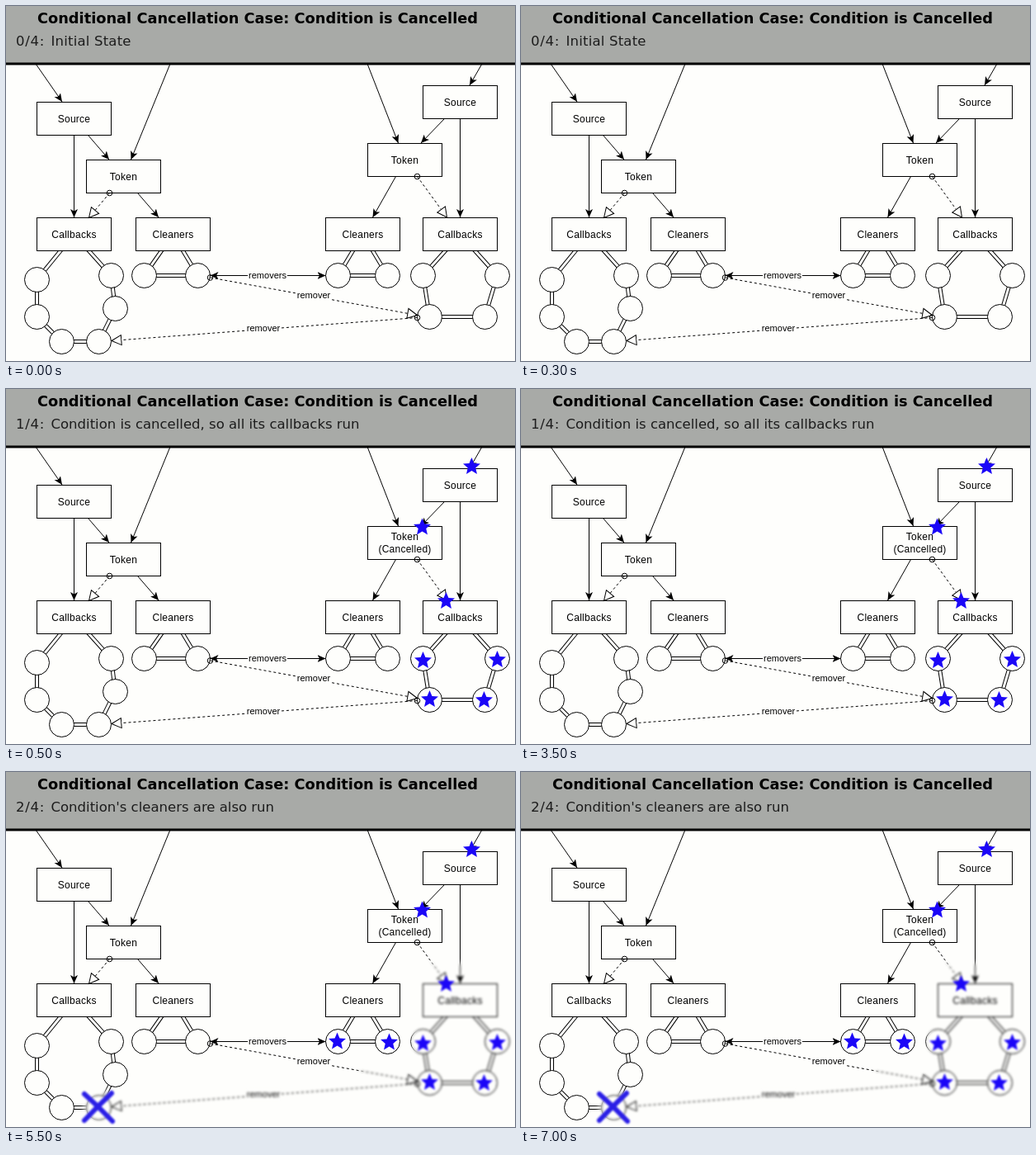
Recreate the animation shown at these times as an HTML page. Size 617x430 px, loop 8 s.

```html
<!DOCTYPE html>
<html lang="en">
<head>
<meta charset="utf-8">
<title>Conditional cancellation</title>
<style>
  html, body { margin: 0; width: 100%; height: 100%; overflow: hidden; background: #fefefc; }
  svg { display: block; width: 617px; height: 430px; }
  .label { font: 12px "Liberation Sans", Arial, sans-serif; letter-spacing: .25px; text-anchor: middle; }
  .tag { font: 11px "Liberation Sans", Arial, sans-serif; text-anchor: middle; }
  .title { font: bold 17.8px "DejaVu Sans", sans-serif; text-anchor: middle; }
  .caption { font: 16.5px "DejaVu Sans", sans-serif; fill: #1c1c1c; }
  .shape { fill: #fefefc; stroke: #000; }
  .edge { fill: none; stroke: #000; }
  .dashed { stroke-dasharray: 3 3; }
</style>
</head>
<body>
<svg viewBox="0 0 617 430">
  <defs>
    <marker id="head" markerUnits="userSpaceOnUse" markerWidth="12" markerHeight="12" refX="10" refY="5" orient="auto-start-reverse">
      <path d="M10 5L0 .5L2.5 5L0 9.5Z"/>
    </marker>
    <marker id="hollow" markerUnits="userSpaceOnUse" markerWidth="14" markerHeight="14" refX="12.5" refY="7" orient="auto">
      <path d="M12.5 7L.7 1V13Z" class="shape"/>
    </marker>
    <marker id="ring" markerUnits="userSpaceOnUse" markerWidth="9" markerHeight="9" refX="4.5" refY="4.5">
      <circle cx="4.5" cy="4.5" r="3.3" class="edge"/>
    </marker>
    <filter id="blur" filterUnits="userSpaceOnUse" x="0" y="0" width="617" height="430" color-interpolation-filters="sRGB">
      <feGaussianBlur stdDeviation="1.8"/>
    </filter>
    <filter id="smudge" filterUnits="userSpaceOnUse" x="0" y="0" width="617" height="430" color-interpolation-filters="sRGB">
      <feGaussianBlur stdDeviation="1"/>
    </filter>
    <filter id="soften" filterUnits="userSpaceOnUse" x="0" y="0" width="640" height="450">
      <feGaussianBlur stdDeviation="3"/>
    </filter>
    <g id="retired" filter="url(#soften)" fill="currentColor" stroke="currentColor">
      <path d="M494 232H640V402H494Z" stroke="none"/>
      <path d="M116 406L505 377" stroke-width="24"/>
      <path d="M430 363L505 376" stroke-width="20"/>
      <circle cx="115" cy="406" r="19"/>
    </g>
    <mask id="outside" maskUnits="userSpaceOnUse" x="0" y="0" width="617" height="430">
      <rect width="617" height="430" fill="#fff"/>
      <use href="#retired" color="#000"/>
    </mask>
    <mask id="inside" maskUnits="userSpaceOnUse" x="0" y="0" width="617" height="430">
      <use href="#retired" color="#fff"/>
    </mask>
  </defs>
  <rect width="617" height="430" fill="#fefefc"/>
  <g id="sharp"><g id="diagram"></g></g>
  <g id="faded" mask="url(#inside)"><g filter="url(#blur)"><use href="#diagram"/></g></g>
  <g fill="#1b06f7">
    <g id="sourceStars"></g>
    <g id="callbackStars"></g>
    <g id="cleanerStars"></g>
  </g>
  <path id="cross" d="M95 390Q112 405 129 423M128 389Q112 404 95 422" fill="none" stroke="#2a1ee6" stroke-width="6" stroke-linecap="round" filter="url(#smudge)"/>
  <rect width="617" height="69" fill="#a8aaa7"/>
  <rect y="68.5" width="617" height="3"/>
  <text class="title" x="305" y="21">Conditional Cancellation Case: Condition is Cancelled</text>
  <text class="caption" id="count" x="12" y="48" letter-spacing=".7"></text>
  <text class="caption" id="caption" x="54.5" y="48"></text>
</svg>
<script>
const NS = 'http://www.w3.org/2000/svg';
const byId = id => document.getElementById(id);
const diagram = byId('diagram');

function add(parent, tag, attrs, text = '') {
  const node = document.createElementNS(NS, tag);
  for (const key in attrs) node.setAttribute(key, attrs[key]);
  node.textContent = text;
  return parent.appendChild(node);
}
const label = (x, y, text) => add(diagram, 'text', { class: 'label', x, y }, text);

// Each ring of nodes passes through the centre of its box.
const rings = [
  'M82.5 276.5L37.5 331.5V376.5L67.5 406.5H112.5L132.5 366.5L127.5 326.5Z',
  'M202.5 276.5L167.5 326.5H232.5Z',
  'M432.5 276.5L402.5 326.5H462.5Z',
  'M550.5 276.5L505.5 326.5L513.5 376.5H580.5L595.5 326.5Z'
];
for (const d of rings) {
  add(diagram, 'path', { d, class: 'edge', 'stroke-width': 5 });
  add(diagram, 'path', { d, fill: 'none', stroke: '#fefefc', 'stroke-width': 3 });
}

const circles = [
  [37, 331], [37, 376], [67, 406], [112, 406], [132, 366], [127, 326],
  [167, 326], [232, 326], [402, 326], [462, 326],
  [505, 326], [513, 376], [580, 376], [595, 326]
];
for (const [x, y] of circles)
  add(diagram, 'circle', { class: 'shape', cx: x + .5, cy: y + .5, r: 15 });

const boxes = [
  [37, 116, 'Source'], [97, 186, 'Token'], [37, 256, 'Callbacks'], [157, 256, 'Cleaners'],
  [505, 96, 'Source'], [438, 166, ''], [387, 256, 'Cleaners'], [505, 256, 'Callbacks']
];
for (const [x, y, text] of boxes) {
  add(diagram, 'rect', { class: 'shape', x: x + .5, y: y + .5, width: 90, height: 40 });
  label(x + 45.5, y + 25, text);
}
const token = label(483.5, 191, 'Token');
const cancelled = label(483.5, 198, '(Cancelled)');

const arrows = [
  'M36 70L68 116', 'M199 70L151.5 186', 'M82.5 156.5V256', 'M99.5 156.5L125 186',
  'M159.5 226.5L185 256', 'M438 70L475.5 166', 'M577 70L562 96', 'M531.5 136.5L503 166',
  'M550.5 136.5V256', 'M472.5 206.5L444.5 256'
];
for (const d of arrows)
  add(diagram, 'path', { d, class: 'edge', 'marker-end': 'url(#head)' });
add(diagram, 'path', {
  d: 'M247.5 326.5H387.5', class: 'edge', 'marker-start': 'url(#head)', 'marker-end': 'url(#head)'
});

const links = [
  'M125.5 226.5L100.5 256.5', 'M498.5 206.5L534.5 256',
  'M247.5 329L498.5 374.5', 'M498.5 377.5L128 405.5'
];
for (const d of links)
  add(diagram, 'path', { d, class: 'edge dashed', 'marker-start': 'url(#ring)', 'marker-end': 'url(#hollow)' });

for (const [x, y, text] of [[317, 326, 'removers'], [373, 350, 'remover'], [312, 390, 'remover']]) {
  const width = text.length * 6;
  add(diagram, 'rect', { x: x - width / 2, y: y - 6, width, height: 13, fill: '#fefefc' });
  add(diagram, 'text', { class: 'tag', x, y: y + 4 }, text);
}

function star(parent, x, y) {
  const points = Array.from({ length: 10 }, (_, i) => {
    const r = i % 2 ? 5 : 11, a = i * Math.PI / 5;
    return [x + r * Math.sin(a), y - r * Math.cos(a)].map(v => v.toFixed(2));
  });
  add(byId(parent), 'polygon', { points: points.join(' ') });
}
const stars = {
  sourceStars: [[564.5, 94], [504.5, 167.5]],
  callbackStars: [[533.5, 257], [505.5, 329], [595.5, 328], [513.5, 376], [579.5, 377]],
  cleanerStars: [[401.5, 326.5], [464.5, 327.5]]
};
for (const group in stars) stars[group].forEach(([x, y]) => star(group, x, y));

const steps = [
  { at: 0, text: 'Initial State', spacing: .2 },
  { at: 500, text: 'Condition is cancelled, so all its callbacks run', spacing: 0 },
  { at: 5500, text: "Condition's cleaners are also run", spacing: 0 }
];
const show = (id, on) => byId(id).setAttribute('display', on ? 'inline' : 'none');
let current = -1;

function render(index) {
  if (index === current) return;
  current = index;
  const last = index === 2;
  byId('count').textContent = index + '/4:';
  byId('caption').textContent = steps[index].text;
  byId('caption').setAttribute('letter-spacing', steps[index].spacing);
  token.setAttribute('y', index ? 183 : 191);
  cancelled.setAttribute('display', index ? 'inline' : 'none');
  ['sourceStars', 'callbackStars'].forEach(id => show(id, index > 0));
  ['faded', 'cross', 'cleanerStars'].forEach(id => show(id, last));
  byId('sharp').setAttribute('mask', last ? 'url(#outside)' : 'none');
  byId('callbackStars').setAttribute('filter', last ? 'url(#smudge)' : 'none');
}

function tick() {
  const time = performance.now() % 8000;
  render(steps.findLastIndex(step => time >= step.at));
  requestAnimationFrame(tick);
}
tick();
</script>
</body>
</html>
```
